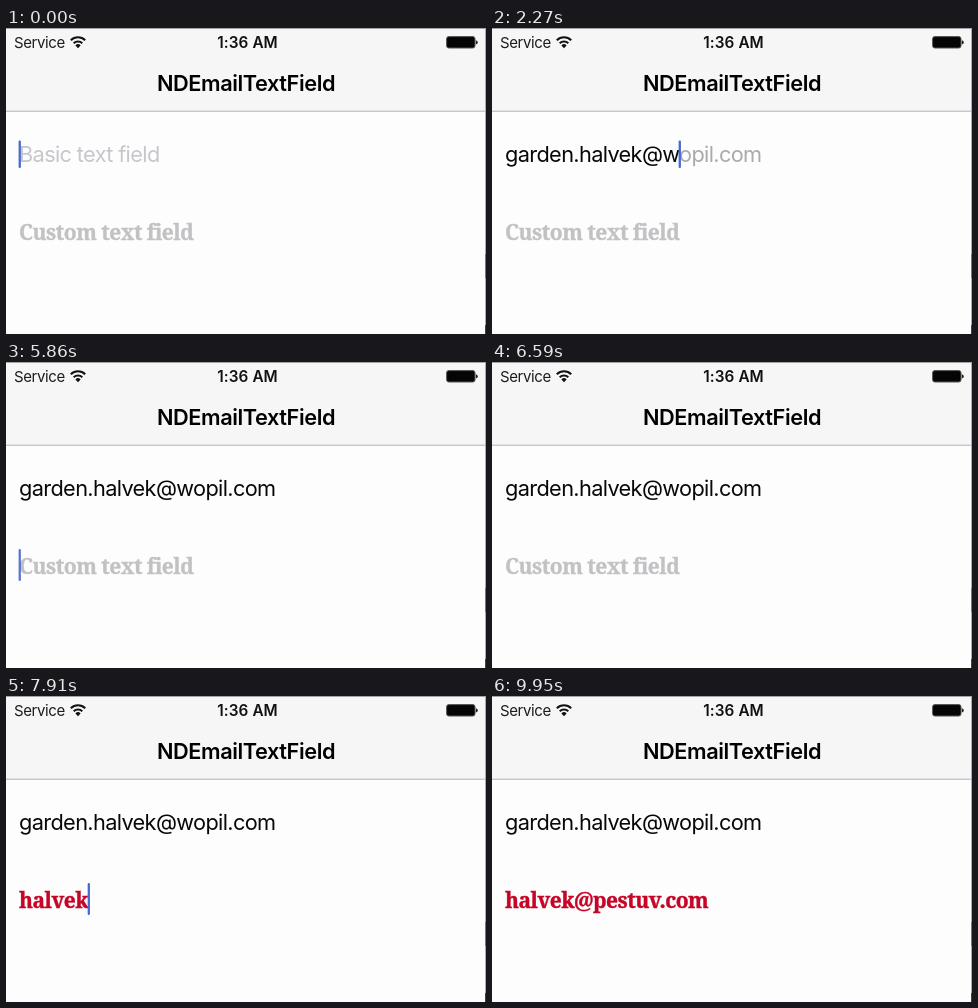
An HTML page that plays this animation: 480 by 306 pixels, repeating every 9990 ms.

```html
<!DOCTYPE html>
<html lang="en">
<head>
<meta charset="utf-8">
<title>NDEmailTextField</title>
<style>
  html, body { margin: 0; width: 100%; height: 100%; overflow: hidden; background: #fff; }
  svg { display: block; width: 480px; height: 306px; }
  text { font-family: Inter, "Open Sans", sans-serif; }
  .status { font-size: 15px; letter-spacing: -0.4px; }
  .clock { font-size: 15.3px; font-weight: 600; letter-spacing: 0.1px; }
  .title { font-size: 21.76px; font-weight: 600; letter-spacing: -0.42px; }
  .basic { font-size: 21.76px; letter-spacing: -0.65px; }
  .custom { font: bold 21px "Noto Serif", "DejaVu Serif", serif; letter-spacing: -0.5px; stroke-width: 0.4px; }
  .caret { fill: #4868d2; }
</style>
</head>
<body>
<svg viewBox="0 0 480 306">
  <rect width="480" height="306" fill="#fefdfe"/>
  <rect width="480" height="83" fill="#f7f6f7"/>
  <rect y="82.6" width="480" height="1.3" fill="#c2c1c3"/>
  <rect width="480" height="1" fill="#a4a4a6"/>
  <rect x="479" width="1" height="306" fill="#acacb0"/>
  <rect x="479" y="226" width="1" height="24" fill="#77777e"/>
  <rect x="479" y="297" width="1" height="9" fill="#3b3b70"/>

  <text class="status" x="8" y="20" fill="#1c1c1c">Service</text>
  <g fill="none" stroke="#111" stroke-width="2">
    <path d="M64.8 12.3a10.2 10.2 0 0 1 14.4 0"/>
    <path d="M67.7 15.2a6.1 6.1 0 0 1 8.6 0"/>
  </g>
  <path d="M72 20.2l-2.6-2.8a3.7 3.7 0 0 1 5.2 0z" fill="#111"/>
  <text class="status clock" x="241.5" y="20" text-anchor="middle" fill="#111">1:36 AM</text>
  <rect x="440.6" y="8.6" width="28.4" height="11.4" rx="2.2" fill="#050505" stroke="#555" stroke-width="1"/>
  <path d="M469.8 12.2q2 .6 2 2.2t-2 2.2z" fill="#222"/>
  <text class="title" x="240" y="62.5" text-anchor="middle">NDEmailTextField</text>
</svg>
<script>
const LOOP = 9990, LEFT = 13;
const svg = document.querySelector('svg');

const fields = [
  {
    cls: 'basic', y: 134, caretY: 112.5, caretH: 27.5,
    hint: 'Basic text field', hintColor: '#c6c6cb',
    ink: '#080808', tailInk: '#aaaaaa',
    name: 'garden.halvek@', domain: 'wopil.com',
    keys: [90, 250, 500, 590, 680, 770, 860, 940, 1090, 1160, 1290, 1400, 1520, 1770, 2230, 2600],
    focus: 0, anchor: 0, done: 3500
  },
  {
    cls: 'custom', y: 212, caretY: 187, caretH: 32,
    hint: 'Custom text field', hintColor: '#c2c2c4',
    ink: '#c60426', tailInk: '#6c0a78',
    name: 'halvek@', domain: 'pestuv.com',
    keys: [7200, 7340, 7460, 7580, 7700, 7820, 7960],
    focus: 4950, anchor: 4780, done: 9450
  }
];

function add(parent, tag, attrs) {
  const el = document.createElementNS('http://www.w3.org/2000/svg', tag);
  for (const key in attrs) el.setAttribute(key, attrs[key]);
  return parent.appendChild(el);
}

for (const f of fields) {
  const line = add(svg, 'text', { class: f.cls, x: LEFT, y: f.y });
  f.head = add(line, 'tspan', {});
  f.tail = add(line, 'tspan', {});
  f.caret = add(svg, 'rect', { class: 'caret', y: f.caretY, width: 2.3, height: f.caretH, rx: 1 });
}

// Solid after a key press, then a one second blink with soft edges.
function blink(since) {
  if (since < 490) return 1;
  const p = (since - 490) % 1000;
  if (p < 230) return 1 - p / 230;
  if (p < 500) return 0;
  return Math.min(1, (p - 500) / 100);
}

function setText(f, el, text, color) {
  if (el.textContent !== text) el.textContent = text;
  el.setAttribute('fill', color);
  if (f.cls === 'custom') el.setAttribute('stroke', color);
}

function drawField(f, t) {
  const full = f.name + f.domain;
  const count = f.keys.filter(k => k <= t).length;
  const done = t >= f.done;

  if (!count) {
    setText(f, f.head, '', f.ink);
    setText(f, f.tail, f.hint, f.hintColor);
  } else {
    const suggest = count >= f.name.length;
    setText(f, f.head, full.slice(0, count), f.ink);
    setText(f, f.tail, suggest ? full.slice(count) : '', done ? f.ink : f.tailInk);
  }

  const active = t >= f.focus && !done;
  const last = count ? f.keys[count - 1] : f.anchor;
  const width = count ? f.head.getComputedTextLength() : 0;
  f.caret.setAttribute('x', LEFT - 0.4 + width);
  f.caret.setAttribute('opacity', active ? blink(t - last) : 0);
}

const start = performance.now();
function frame() {
  const t = (performance.now() - start) % LOOP;
  for (const f of fields) drawField(f, t);
  requestAnimationFrame(frame);
}
frame();
</script>
</body>
</html>
```
